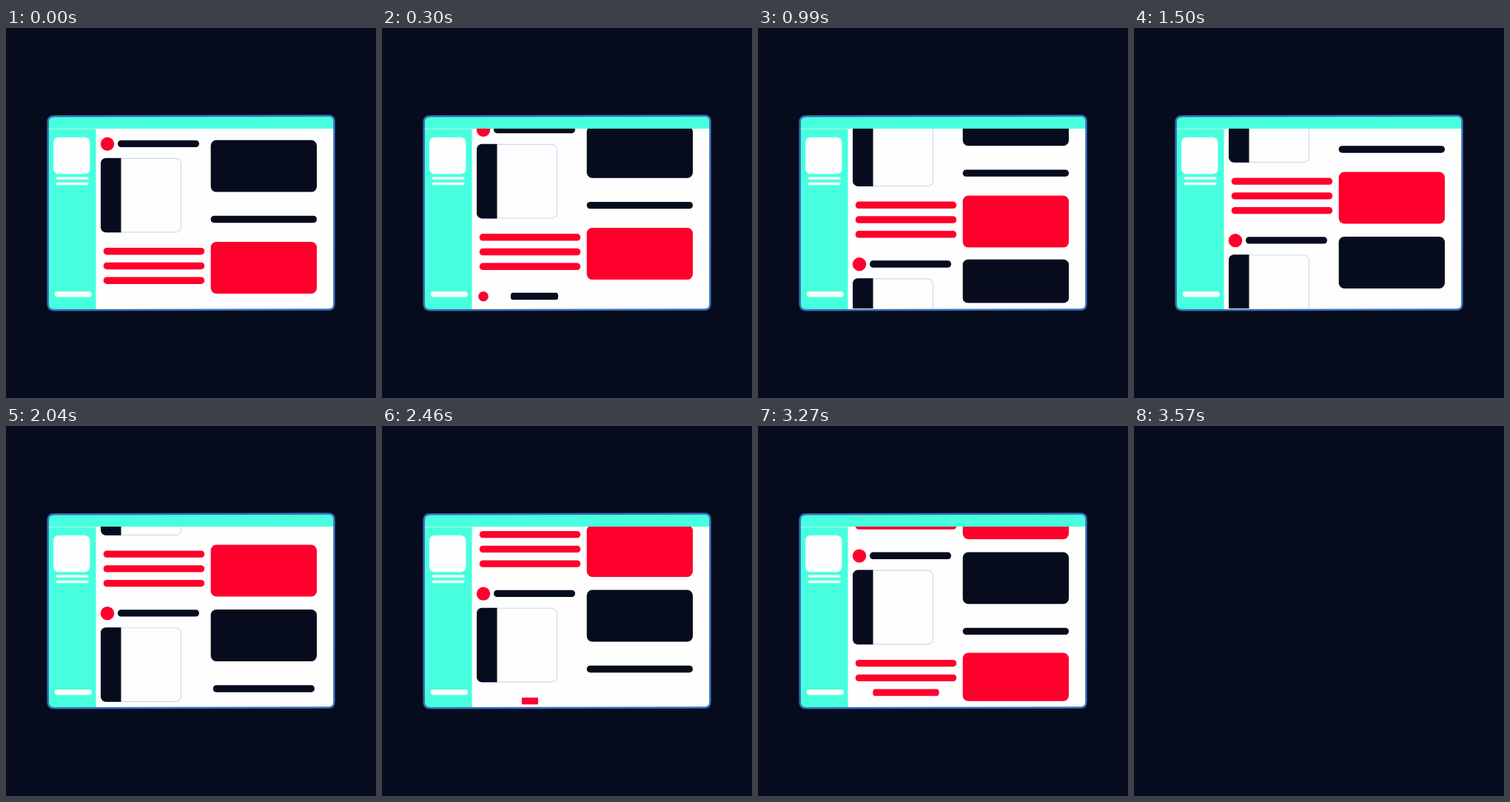
These frames come from a looping animation (500 by 500 pixels, 3600 ms). An HTML page with a canvas:

```html
<!DOCTYPE html>
<html lang="en">
<head>
<meta charset="utf-8">
<title>Scrolling page</title>
<style>
html, body { margin: 0; width: 100%; height: 100%; overflow: hidden; background: #060c1e; }
canvas { display: block; width: 500px; height: 500px; }
</style>
</head>
<body>
<canvas id="stage" width="500" height="500"></canvas>
<script>
const ctx = document.getElementById('stage').getContext('2d');
const LOOP = 3600, STEP = 30, END = 3570, PAGE = 225, GROW = 600;
const NAVY = '#060c1e', RED = '#ff002d', TEAL = '#47ffde', WHITE = '#fefefe', BLUE = '#3a6fb8', PALE = '#cbdaf0';

function box(x, y, w, h, r, fill) {
  ctx.beginPath();
  ctx.roundRect(x, y, w, h, r);
  ctx.fillStyle = fill;
  ctx.fill();
}

function grown(t, start, duration = GROW) {
  const p = Math.min(1, Math.max(0, (t - start) / duration));
  return p * p * (3 - 2 * p);
}

// Draw with a scale about a fixed point.
function scaled(cx, cy, sx, sy, draw) {
  if (sx <= 0 || sy <= 0) return;
  ctx.save();
  ctx.translate(cx, cy);
  ctx.scale(sx, sy);
  ctx.translate(-cx, -cy);
  draw();
  ctx.restore();
}

function bar(x, y, w, fill, s) {
  scaled(x + w / 2, y, s, 1, () => box(x, y - 4.7, w, 9.4, 4.5, fill));
}

function block(y, fill, anchor, s) {
  scaled(348, anchor, 1, s, () => box(276.7, y, 143.3, 70, 7.5, fill));
}

function card() {
  ctx.beginPath();
  ctx.roundRect(128.5, 176.3, 108, 99.6, 7);
  ctx.fillStyle = WHITE;
  ctx.fill();
  ctx.strokeStyle = PALE;
  ctx.lineWidth = 1.2;
  ctx.stroke();
  box(128, 175.7, 27.5, 100.6, [7, 0, 0, 7], NAVY);
}

// grow(start, duration) gives the scale of each part of the page.
function page(grow) {
  const dot = grow(0, 450);
  scaled(137, 156.7, dot, dot, () => box(127.8, 147.5, 18.4, 18.4, 9.2, RED));
  bar(151, 156.4, 110, NAVY, grow(0, 540));
  card();
  for (let i = 0; i < 3; i++) {
    bar(131.7, 301.7 + i * 19.75, 136.5, RED, grow(2307 + i * 300));
  }
  block(151.6, NAVY, 143.2, grow(543));
  bar(276.7, 258.5, 143.3, NAVY, grow(1515));
  block(289, RED, 270, grow(2766));
}

function frame(t) {
  ctx.fillStyle = NAVY;
  ctx.fillRect(0, 0, 500, 500);
  if (t >= END) return;

  box(57, 119, 386, 262, 8, WHITE);
  ctx.save();
  ctx.beginPath();
  ctx.roundRect(57, 119, 386, 262, 8);
  ctx.clip();
  box(57, 119, 386, 17, 0, TEAL);
  box(57, 136.6, 64.5, 245, 0, TEAL);
  ctx.restore();

  box(64, 147.8, 49.4, 49.4, 7, WHITE);
  box(67.5, 201.3, 44, 3.4, 1.7, WHITE);
  box(67.5, 208.8, 44, 3.4, 1.7, WHITE);
  box(65.7, 356, 50, 7.5, 3.7, WHITE);

  ctx.save();
  ctx.beginPath();
  ctx.rect(121.5, 136, 320, 243);
  ctx.clip();
  ctx.translate(0, -PAGE * t / END);
  page(() => 1);
  ctx.translate(0, PAGE);
  page((start, duration) => grown(t, start, duration));
  ctx.restore();

  // Window outline with a slight slant.
  ctx.beginPath();
  ctx.moveTo(65, 119.3);
  ctx.lineTo(436, 118.6);
  ctx.quadraticCurveTo(443.5, 118.6, 443.5, 126);
  ctx.lineTo(443.4, 373);
  ctx.quadraticCurveTo(443.4, 380.4, 436, 380.5);
  ctx.lineTo(65, 381.3);
  ctx.quadraticCurveTo(56.7, 381.3, 56.7, 373);
  ctx.lineTo(56.7, 127);
  ctx.quadraticCurveTo(56.7, 119.3, 65, 119.3);
  ctx.strokeStyle = BLUE;
  ctx.lineWidth = 2.5;
  ctx.stroke();
}

const began = performance.now();
function tick() {
  const t = (performance.now() - began) % LOOP;
  frame(Math.floor(t / STEP) * STEP);
  requestAnimationFrame(tick);
}
tick();
</script>
</body>
</html>
```
